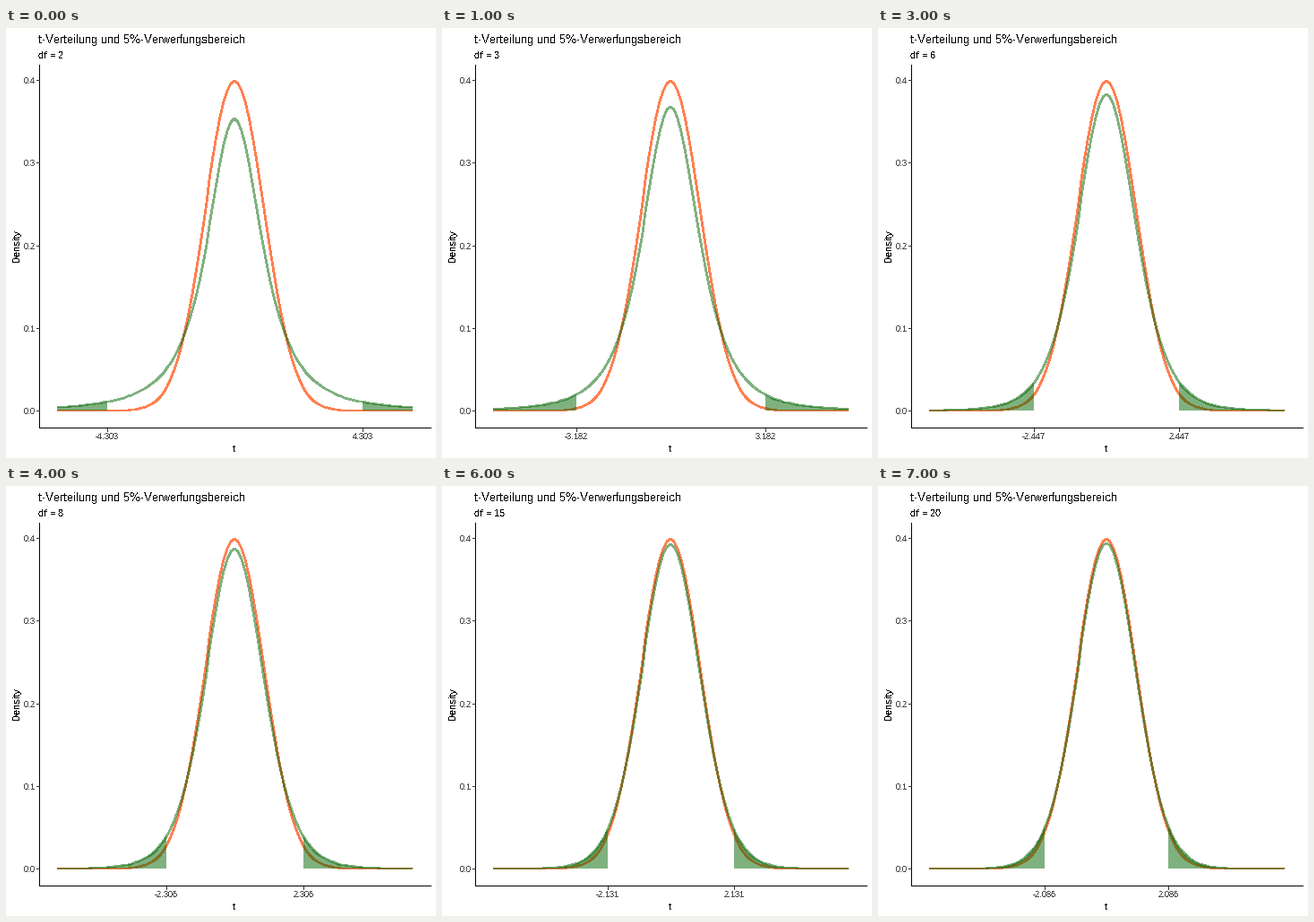
A matplotlib script for the animation above (8000 ms loop, 480 by 480 pixels).

```python
import math

import matplotlib
import matplotlib.pyplot as plt
import numpy as np
from matplotlib.animation import FuncAnimation

SIZE, DPI = 480, 72
LEFT, RIGHT, TOP, BOTTOM = 37, 474, 41, 446
MID, BASE = 255.3, 427.2
X_UNIT, Y_UNIT = 33.1, 922.5
CURVE_WIDTH = 1.7

CORAL, GREEN = "#ff7f50", "#006400"
TICK, LABEL = "#333333", "#4d4d4d"

# degrees of freedom and two-sided 5% critical value
STEPS = [(2, 4.303), (3, 3.182), (4, 2.776), (6, 2.447),
         (8, 2.306), (10, 2.228), (15, 2.131), (20, 2.086)]

matplotlib.rcParams.update({
    "font.family": "Liberation Sans",
    "text.hinting": "native",
    "text.hinting_factor": 1,
    "text.antialiased": False,
})


# Points sit on whole pixels, which gives the curves their slight kinks.
def px(t):
    return np.rint(MID + X_UNIT * t)


def py(density):
    return np.rint(BASE - Y_UNIT * density)


def normal_pdf(t):
    return np.exp(-t * t / 2) / math.sqrt(2 * math.pi)


def t_pdf(t, df):
    scale = math.gamma((df + 1) / 2) / (math.sqrt(df * math.pi) * math.gamma(df / 2))
    return scale * (1 + t * t / df) ** (-(df + 1) / 2)


fig = plt.figure(figsize=(SIZE / DPI, SIZE / DPI), dpi=DPI, facecolor="white")
ax = fig.add_axes([0, 0, 1, 1])
ax.set(xlim=(0, SIZE), ylim=(SIZE, 0))
ax.axis("off")


def line(x, y, color, width=1, **kw):
    return ax.plot(x, y, color=color, lw=width, antialiased=False,
                   solid_capstyle="butt", **kw)[0]


def text(x, y, s, size, color="black", **kw):
    return ax.text(x, y, s, size=size, color=color, va="baseline", **kw)


grid = np.linspace(-6, 6, 101)
line(px(grid), py(normal_pdf(grid)), CORAL, CURVE_WIDTH, snap=False, zorder=2)
curve = line([], [], GREEN, CURVE_WIDTH, alpha=0.5, snap=False, zorder=3)
tails = [ax.fill([0, 0, 0], [0, 0, 0], color=GREEN, alpha=0.5, lw=0,
                 antialiased=False, snap=False, zorder=4)[0] for _ in range(2)]

line([LEFT, LEFT], [TOP, BOTTOM], "black")
line([LEFT, RIGHT], [BOTTOM, BOTTOM], "black")
for k in range(5):
    y = py(k / 10)
    line([34, 37], [y, y], TICK)
    text(33, y + 4, f"{k / 10:.1f}", 9, LABEL, ha="right")

text(36.5, 17, "t-Verteilung und 5%-Verwerfungsbereich", 13)
subtitle = text(36.5, 34, "", 11)
text(MID - 1, 473, "t", 11, ha="center")
ax.text(17, 243, "Density", size=11, rotation=90, ha="right", va="center")

x_ticks = [line([], [], TICK) for _ in range(2)]
x_labels = [text(0, 459, "", 9, LABEL, ha="center") for _ in range(2)]


def update(i):
    df, crit = STEPS[i]
    subtitle.set_text(f"df = {df}")
    curve.set_data(px(grid), py(t_pdf(grid, df)))
    for sign, tail, tick, label in zip((-1, 1), tails, x_ticks, x_labels):
        t = sign * np.linspace(crit, 6, 101)
        top = np.column_stack([px(t), py(t_pdf(t, df))])
        x, floor = px(sign * crit), py(0)
        tail.set_xy(np.vstack([top, [px(sign * 6), floor], [x, floor]]))
        tick.set_data([x, x], [447, 450])
        label.set_x(x)
        label.set_text(f"{sign * crit:.3f}")
    return [subtitle, curve, *tails, *x_ticks, *x_labels]


anim = FuncAnimation(fig, update, frames=len(STEPS), interval=1000,
                     repeat=True, blit=False)
plt.show()
```
